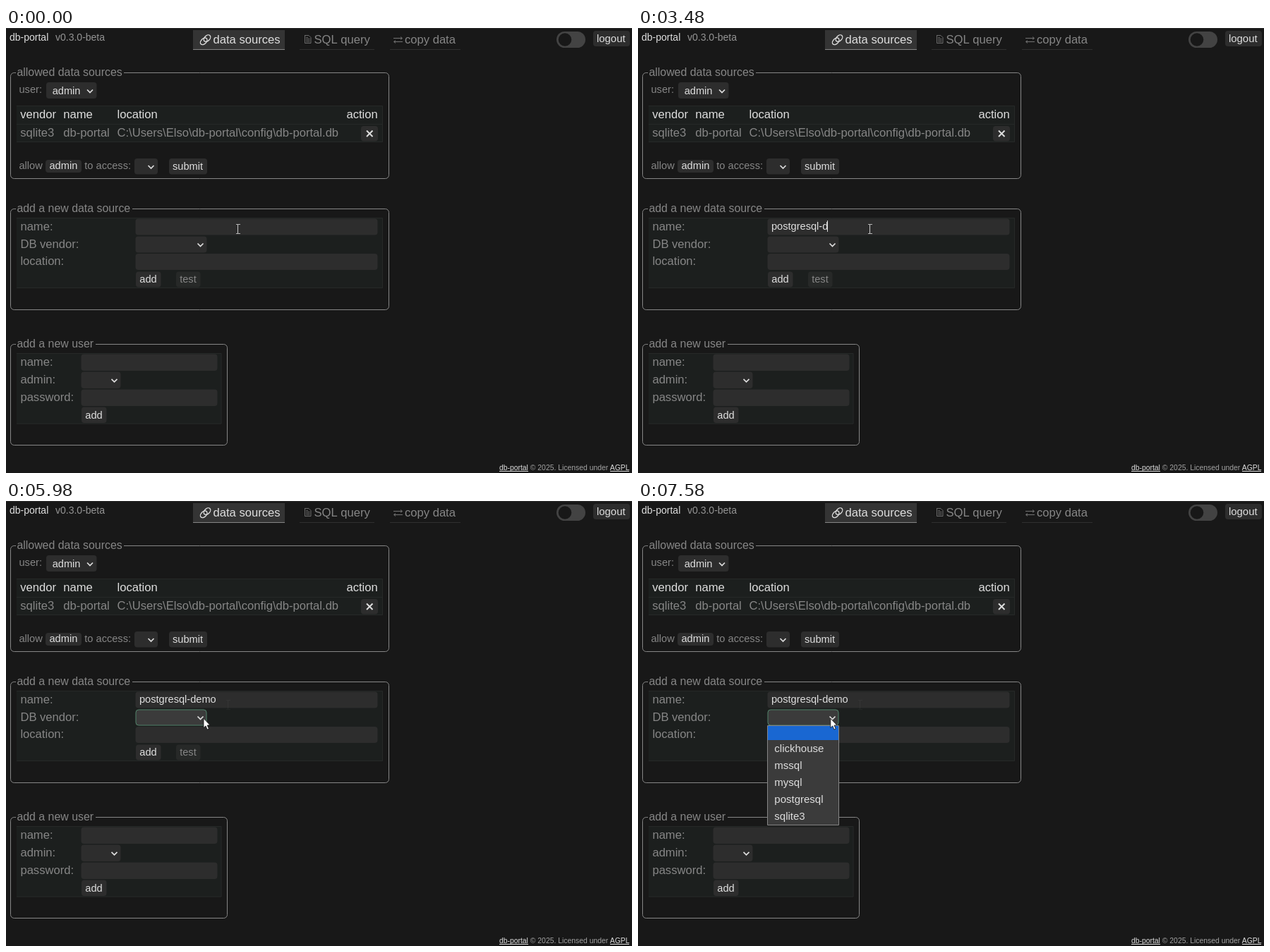
These frames come from a looping animation (887x631 px, 8000 ms). An HTML page with a canvas:

```html
<!DOCTYPE html>
<html lang="en">
<head>
<meta charset="utf-8">
<title>Data sources</title>
<style>
html, body { margin: 0; width: 100%; height: 100%; overflow: hidden; background: #181818; }
canvas { display: block; }
</style>
</head>
<body>
<canvas id="stage" width="887" height="631"></canvas>
<script>
const ctx = document.getElementById('stage').getContext('2d');
const LOOP = 8000;
const SANS = '"Liberation Sans", Arial, sans-serif';
const TIP = '"Open Sans", "Noto Sans", sans-serif';
const BG = '#181818', FIELD = '#2d2d2d', LIT = '#3b3b3b';
const BRIGHT = '#dedede', DIM = '#868686', FAINT = '#747474', EDGE = '#868686';
const BODY = 16.6, CTRL = 14.6, SMALL = 10.4;
const NAME = 'postgresql-demo';
// [time, letters typed]
const KEYS = [[480, 2], [980, 4], [1230, 5], [1490, 6], [1740, 7], [1990, 8], [2490, 9],
  [2740, 10], [3280, 11], [3480, 12], [3730, 13], [3980, 14], [4240, 15]];

function text(str, x, y, size, color, family = SANS) {
  ctx.font = `${size}px ${family}`;
  ctx.fillStyle = color;
  ctx.fillText(str, x, y);
}

function rect(x1, y1, x2, y2, color) {
  ctx.fillStyle = color;
  ctx.fillRect(x1, y1, x2 - x1, y2 - y1);
}

function round(x1, y1, x2, y2, r, fill, stroke) {
  ctx.beginPath();
  ctx.roundRect(x1, y1, x2 - x1, y2 - y1, r);
  if (fill) { ctx.fillStyle = fill; ctx.fill(); }
  if (stroke) { ctx.strokeStyle = stroke; ctx.lineWidth = 1; ctx.stroke(); }
}

function line(points, color, width = 1) {
  ctx.beginPath();
  points.forEach(([x, y], i) => i ? ctx.lineTo(x, y) : ctx.moveTo(x, y));
  ctx.strokeStyle = color;
  ctx.lineWidth = width;
  ctx.stroke();
}

const box = (x1, y1, x2, y2, fill = FIELD) => round(x1, y1, x2, y2, 4, fill);

function chevron(x, y) {
  line([[x - 4, y - 2], [x, y + 2], [x + 4, y - 2]], BRIGHT, 1.7);
}

function button(label, x1, y1, x2, y2, tx, ty, color = BRIGHT, fill = FIELD) {
  box(x1, y1, x2, y2, fill);
  text(label, tx, ty, CTRL, color);
}

function fieldset(label, y1, x2, y2, gapEnd) {
  round(6.5, y1, x2, y2, 5, null, EDGE);
  rect(14, y1 - 2, gapEnd, y1 + 2, BG);
  text(label, 15.4, y1 + 4.5, 15.9, DIM);
}

function table(y1, x2, y2) {
  rect(15, y1, x2, y2, '#1c1f1e');
  line([[15, y1 + .5], [x2 - .5, y1 + .5], [x2 - .5, y2 - .5], [15, y2 - .5]], '#262928');
}

function header() {
  rect(0, 0, 887, 1, '#2c2c2c');
  text('db-portal', 5, 18, 14, BRIGHT);
  text('v0.3.0-beta', 70, 18, 14, '#949494');

  rect(265, 3, 395, 31, '#343434');
  rect(265, 30, 395, 31, '#858585');
  ctx.strokeStyle = BRIGHT;
  ctx.lineWidth = 1.4;
  for (const [x, y] of [[280.2, 18.8], [285, 14.6]]) {
    ctx.beginPath();
    ctx.ellipse(x, y, 5.6, 3.7, -Math.PI / 4, 0, 2 * Math.PI);
    ctx.stroke();
  }
  text('data sources', 293.5, 22, BODY, BRIGHT);

  rect(416, 30, 522, 31, '#303030');
  line([[423.5, 10.5], [429, 10.5], [432, 13.5], [432, 21.5], [423.5, 21.5], [423.5, 10]], FAINT, .9);
  for (let y = 13.5; y < 20; y += 2) line([[425, y], [y < 14 ? 428 : 430.5, y]], FAINT, .8);
  text('SQL query', 436.5, 22, BODY, DIM);

  rect(544, 30, 644, 31, '#303030');
  line([[549, 14.5], [561.5, 14.5]], FAINT);
  line([[559, 12.5], [561.3, 14.5], [559, 16.5]], FAINT);
  line([[562, 19.5], [549.5, 19.5]], FAINT);
  line([[552, 17.5], [549.7, 19.5], [552, 21.5]], FAINT);
  text('copy data', 565, 22, BODY, DIM);

  round(780, 5, 821, 28, 11.5, '#434343');
  ctx.beginPath();
  ctx.arc(792, 16.5, 9.3, 0, 2 * Math.PI);
  ctx.fillStyle = BG;
  ctx.fill();
  box(832, 4, 884, 26);
  text('logout', 837, 20, 14.9, BRIGHT);
}

function allowed() {
  fieldset('allowed data sources', 63.5, 542.5, 213.5, 167);
  text('user:', 18.5, 92, CTRL, DIM);
  button('admin', 57, 77, 128.5, 100, 65.7, 94);
  chevron(119, 89.5);

  table(110, 534, 162);
  rect(15, 136, 534, 137, '#262928');
  const cols = [['vendor', 'sqlite3', 20.3], ['name', 'db-portal', 81.3],
    ['location', 'C:\\Users\\Elso\\db-portal\\config\\db-portal.db', 157.5]];
  for (const [head, cell, x] of cols) {
    text(head, x, 128, BODY, BRIGHT);
    text(cell, x, 154, BODY, DIM);
  }
  text('action', 482.4, 128, BODY, BRIGHT);
  box(503, 139, 527, 160.5);
  line([[511, 145.5], [519.5, 154]], BRIGHT, 2);
  line([[519.5, 145.5], [511, 154]], BRIGHT, 2);

  text('allow', 18.5, 200, CTRL, DIM);
  button('admin', 56, 187, 107, 205, 61.5, 200);
  text('to access:', 111.3, 200, CTRL, DIM);
  box(182, 185, 215, 207.5);
  chevron(205.5, 197);
  button('submit', 231, 185, 285, 207.5, 236, 201);
}

function addSource() {
  fieldset('add a new data source', 256.5, 542.5, 399.5, 179);
  table(269, 534, 369);
  text('name:', 20.4, 287, BODY, DIM);
  text('DB vendor:', 20.4, 312, BODY, DIM);
  text('location:', 20.4, 336, BODY, DIM);
  box(183.5, 270.5, 526.5, 293.5);
  box(183.5, 295.5, 284.5, 318.5);
  box(183.5, 320, 526.5, 343);
  chevron(275.5, 307.5);
  button('add', 184, 345.5, 219.5, 367.5, 189.3, 361);
  button('test', 241, 345.5, 275.5, 367.5, 246.2, 361, DIM, '#272928');
}

function addUser() {
  fieldset('add a new user', 448.5, 313.5, 591.5, 127);
  table(461, 305.5, 561.5);
  text('name:', 20.4, 479, BODY, DIM);
  text('admin:', 20.4, 504, BODY, DIM);
  text('password:', 20.4, 529, BODY, DIM);
  box(106.5, 462.5, 299.5, 486);
  box(106.5, 487.5, 162.5, 511);
  box(106.5, 512.5, 299.5, 536);
  chevron(153.5, 499.8);
  button('add', 107, 537.5, 142.5, 560, 112.3, 554);
}

function footer() {
  text('db-portal', 698.9, 627, SMALL, BRIGHT);
  text('© 2025. Licensed under', 742.8, 627, SMALL, '#a2a2a2');
  text('AGPL', 855.8, 627, SMALL, BRIGHT);
  rect(699, 628, 740, 629, BRIGHT);
  rect(856, 628, 883, 629, BRIGHT);
}

function nameField(t) {
  const selected = t >= 5240 && t < 5480;
  let count = 0;
  for (const [at, n] of KEYS) if (t >= at) count = n;
  if (!count) return;
  const typed = NAME.slice(0, count);
  if (selected) rect(189, 273, 298, 290, '#094ead');
  text(typed, 189, 286, CTRL, selected ? '#fff' : BRIGHT);
  if (t < 4730) {
    const x = Math.floor(189 + ctx.measureText(typed).width - .4);
    rect(x, 273, x + 1, 289, BRIGHT);
  }
}

function beam(x, y, alpha) {
  ctx.globalAlpha = alpha;
  rect(x - 3, y - 7, x + 3, y - 6, '#b4b4b4');
  rect(x - 1, y - 6, x, y + 6, '#c8c8c8');
  rect(x - 3, y + 6, x + 3, y + 7, '#b4b4b4');
  ctx.globalAlpha = 1;
}

function arrow(x, y) {
  ctx.beginPath();
  [[0, 0], [0, 13.3], [3, 10.6], [5.1, 15.8], [7.4, 14.8], [5.2, 9.8], [9, 9.5]]
    .forEach(([dx, dy]) => ctx.lineTo(x + dx, y + dy));
  ctx.closePath();
  ctx.fillStyle = '#fff';
  ctx.fill();
  ctx.strokeStyle = '#111';
  ctx.lineWidth = .8;
  ctx.stroke();
}

function menu() {
  round(183.5, 318.5, 284.5, 459.5, 0, LIT, '#868686');
  rect(184, 319, 284, 339, '#1967d2');
  ['clickhouse', 'mssql', 'mysql', 'postgresql', 'sqlite3']
    .forEach((item, i) => text(item, 193.3, 356 + 24 * i, 15, BRIGHT));
}

function vendorField(t) {
  round(184, 296, 284, 318, 4, LIT, '#4f8168');
  if (t >= 7310 && t < 7580) {
    ctx.beginPath();
    ctx.arc(272, 307.8, 10, 0, 2 * Math.PI);
    ctx.fillStyle = '#a39c1d';
    ctx.fill();
  }
  chevron(275.5, 307.5);
  if (t >= 7580) menu();
  if (t >= 6800 && t < 7310) {
    round(288.5, 320.5, 465.5, 340.5, 0, BG, '#d0d0d0');
    text('Sélectionnez un élément dans la liste.', 294, 334, 9.5, '#f0f0f0', TIP);
  }
  if (t < 7040) arrow(280, 308.3);
  if (t >= 7310) arrow(272.8, 308.3);
}

function draw(t) {
  rect(0, 0, 887, 631, BG);
  header();
  allowed();
  addSource();
  addUser();
  footer();
  nameField(t);
  if (t < 5730) beam(329, 285, 1);
  else beam(315, 289, t < 5980 ? 1 : .05);
  if (t >= 5980) vendorField(t);
}

const start = performance.now();
function tick() {
  draw((performance.now() - start) % LOOP);
  requestAnimationFrame(tick);
}
tick();
</script>
</body>
</html>
```
